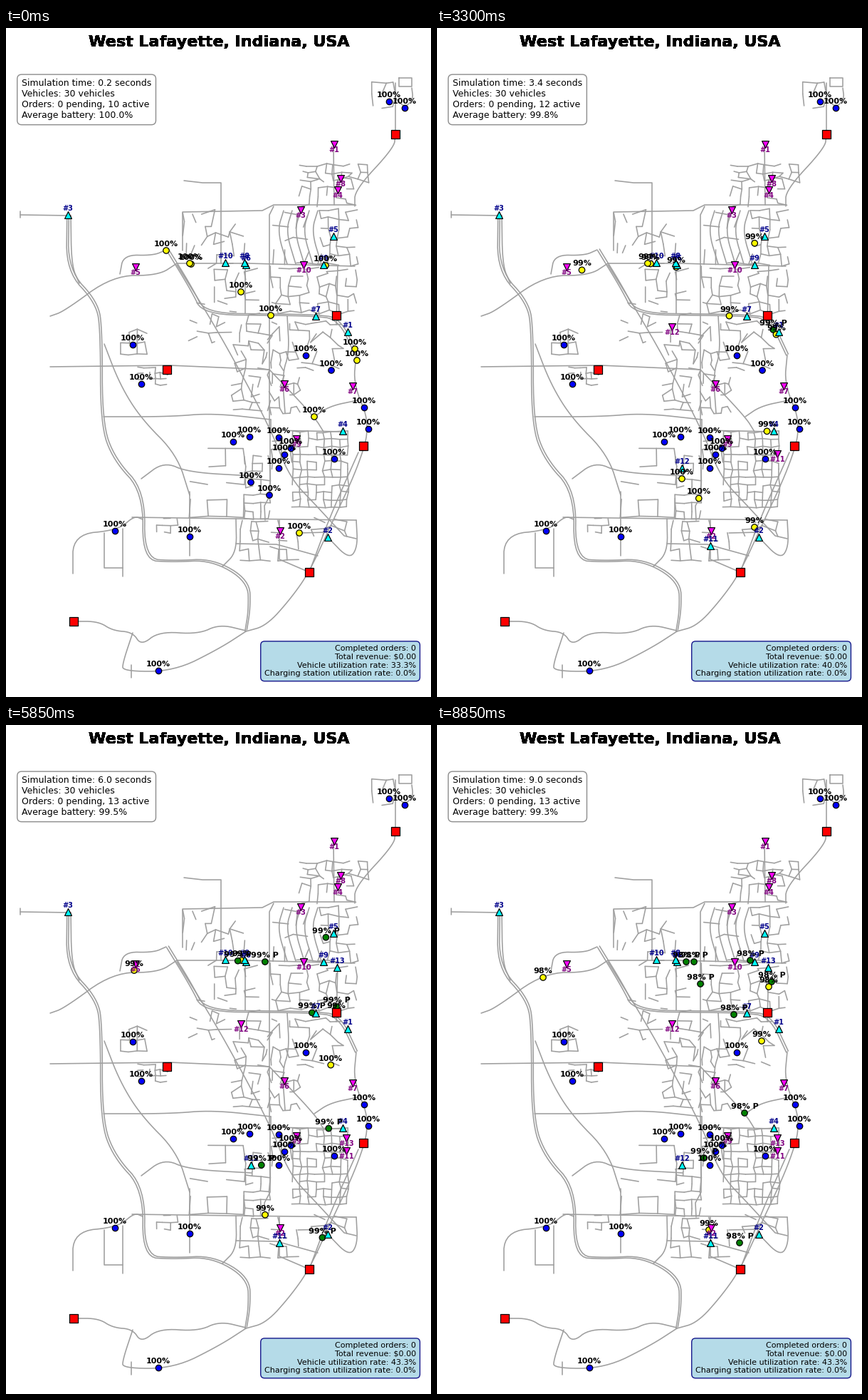
Recreate the animation shown at these times as a matplotlib script. Size 597x938 px, loop 9000 ms.

```python
import matplotlib.pyplot as plt
import numpy as np
from matplotlib.animation import FuncAnimation
from matplotlib.collections import LineCollection

W, H, DPI = 597, 938, 100
FRAMES, INTERVAL = 60, 150
LAST = FRAMES - 1
CLOCK = np.cumsum(np.full(3 * FRAMES, 0.05))[2::3]

rng = np.random.default_rng(4)

fig = plt.figure(figsize=(W / DPI, H / DPI), dpi=DPI, facecolor="white")
ax = fig.add_axes([0, 0, 1, 1])
ax.set_xlim(0, W)
ax.set_ylim(H, 0)
ax.axis("off")

# ---------------------------------------------------------------- roads
lines = []


def road(*pts):
    lines.append(np.array(pts, float))


def curve(*pts, shift=(0, 0)):
    """Polyline with its corners cut round."""
    q = np.array(pts, float)
    for _ in range(3):
        a, b = q[:-1], q[1:]
        cut = np.stack([0.75 * a + 0.25 * b, 0.25 * a + 0.75 * b], 1)
        q = np.vstack([q[:1], cut.reshape(-1, 2), q[-1:]])
    lines.append(q + shift)


def twin(*pts):
    """Divided highway."""
    curve(*pts, shift=(1.3, -1))
    curve(*pts, shift=(-1.3, 1))


def district(x0, y0, x1, y1, step=12, keep=0.65, jitter=2):
    """Jittered street grid with some of its blocks left open."""
    nx = round((x1 - x0) / step) + 1
    ny = round((y1 - y0) / step) + 1
    grid = np.stack(np.meshgrid(np.linspace(x0, x1, nx),
                                np.linspace(y0, y1, ny)), -1)
    grid += rng.normal(0, jitter, grid.shape)
    for p in (grid, grid.swapaxes(0, 1)):
        edges = np.stack([p[:, :-1], p[:, 1:]], 2).reshape(-1, 2, 2)
        lines.extend(edges[rng.random(len(edges)) < keep])


# highways
road((20, 262), (91, 263))
road((20, 257), (20, 266))
twin((87, 263), (86, 340), (128, 385), (134, 425), (134, 555), (152, 605),
     (194, 650), (193, 745), (235, 748), (290, 745), (341, 775), (342, 815),
     (337, 845))
curve((91, 263), (92, 333), (103, 358))
twin((227, 311), (262, 368), (278, 401), (380, 402), (432, 403), (468, 407),
     (492, 458))
curve((492, 458), (488, 500), (512, 555), (495, 615), (455, 700), (426, 763),
      (400, 800), (366, 838), (337, 846))
curve((495, 595), (455, 685), (426, 763))
curve((240, 332), (300, 428), (372, 562), (398, 630), (436, 670))

# west and south
curve((62, 404), (82, 397), (150, 347), (214, 347), (240, 330))
curve((225, 311), (207, 319), (165, 318), (160, 345))
road((62, 475), (230, 473), (370, 479))
curve((138, 443), (160, 500), (190, 548), (240, 598), (258, 655))
road((258, 650), (258, 740))
curve((137, 545), (230, 545), (290, 540), (372, 549))
curve((190, 632), (222, 608), (256, 623), (345, 628))
curve((94, 765), (94, 710), (158, 704), (180, 684), (192, 689))
road((138, 708), (138, 757), (164, 757), (164, 769))
road((164, 702), (164, 757))
road((177, 686), (320, 688), (492, 690))
curve((95, 832), (130, 832), (150, 845), (178, 847), (190, 866), (215, 846),
      (270, 850), (300, 836), (337, 845))
curve((178, 848), (164, 890), (164, 902), (236, 902), (300, 870), (337, 846))
road((176, 893), (176, 911))

# north
curve((547, 150), (545, 168), (490, 227), (490, 250))
road((547, 77), (547, 150))
road((552, 70), (570, 70), (570, 82), (552, 82), (552, 70))
curve((547, 98), (560, 112), (572, 100), (570, 84))
road((250, 214), (276, 217), (302, 217), (302, 330))
road((248, 312), (248, 258), (360, 256), (376, 248), (490, 248))
road((376, 250), (370, 262), (370, 560))
road((460, 163), (461, 248))
road((240, 330), (340, 330), (490, 334))
road((466, 334), (464, 416))
road((336, 331), (336, 400))
for x in range(386, 440, 12):
    curve((x + 4, 256), (x - 5, 285), (x + 9, 331))

# centre and river bank
curve((370, 479), (433, 545), (446, 566))
curve((395, 404), (398, 455), (388, 485), (392, 540))
curve((433, 545), (455, 530), (494, 522))
road((372, 549), (372, 564), (473, 566))
road((371, 565), (371, 655), (363, 670), (364, 690))
curve((323, 688), (324, 735), (304, 755))
road((323, 723), (380, 724), (438, 740))
road((384, 690), (384, 745), (426, 763))
road((410, 708), (452, 707))
curve((452, 714), (482, 745), (494, 728), (492, 690))
road((436, 670), (475, 712), (492, 716))

# neighbourhoods
district(515, 76, 547, 108, 16)
district(413, 192, 508, 212)
district(413, 212, 490, 248)
district(440, 256, 492, 331)
district(376, 262, 440, 331, 16, 0.3)
district(250, 262, 335, 330, 14, 0.35, 3)
district(292, 340, 352, 382, 14, 0.45)
district(372, 338, 492, 398, 13, 0.55)
district(258, 386, 368, 440, 14, 0.3, 3)
district(372, 412, 470, 478, 13, 0.45, 3)
district(320, 442, 370, 535, 12, 0.5, 3)
district(374, 488, 412, 540, 11, 0.5, 3)
district(402, 566, 480, 672, 11, 0.8, 1)
district(374, 566, 402, 620, 12, 0.5)
district(335, 600, 370, 688, 11, 0.65, 1)
district(258, 590, 335, 686, 24, 0.5, 1)
district(330, 692, 410, 745, 13, 0.5)
district(432, 690, 475, 712, 13, 0.5)
district(160, 428, 196, 456, 12, 0.7)
district(185, 476, 226, 500, 9, 0.5, 1)
district(212, 688, 240, 708, 9, 0.6, 1)

ax.add_collection(LineCollection(lines, colors="#9f9f9f", linewidths=1.15,
                                 capstyle="round", zorder=1))

# ---------------------------------------------------------------- title
# Overlaid copies give the title its hard, heavy edges.
for _ in range(20):
    ax.text(299.5, 26, "West Lafayette, Indiana, USA", size=16,
            weight="bold", ha="center", va="baseline")

# ---------------------------------------------------------------- data
stations = [(547, 149), (464, 403), (226, 479), (502, 586), (426, 763),
            (95, 832)]
pickups = [(480, 426), (452, 714), (87, 262), (473, 565), (460, 292),
           (337, 332), (435, 404), (335, 329), (446, 332), (308, 329),
           (384, 726), (344, 617), (465, 340)]
dropoffs = [(461, 163), (385, 705), (414, 255), (466, 227), (182, 335),
            (391, 499), (487, 502), (470, 211), (408, 576), (418, 332),
            (478, 597), (330, 419), (478, 579)]
placed = [0] * 10 + [19, 19, 37]
parked = [(538, 103), (560, 112), (178, 444), (190, 499), (421, 459),
          (503, 532), (509, 562), (461, 604), (342, 573), (319, 580),
          (383, 574), (400, 589), (391, 598), (383, 617), (153, 705),
          (258, 713), (214, 901)]


def along(path, u):
    """Point at share u of the path's length."""
    p = np.array(path, float)
    s = np.r_[0, np.cumsum(np.hypot(*np.diff(p, axis=0).T))]
    d = np.clip(u, 0, 1) * s[-1]
    return np.interp(d, s, p[:, 0]), np.interp(d, s, p[:, 1])


class Trip:
    """Drives to the rider at an even pace, then on towards the goal."""

    def __init__(self, fetch, carry=(), boards=LAST, start=0, worn=False):
        self.fetch, self.carry = fetch, [fetch[-1], *carry]
        self.boards, self.start, self.worn = boards, start, worn

    def riding(self, n):
        return len(self.carry) > 1 and n >= self.boards

    def at(self, n):
        if self.riding(n):
            return along(self.carry, (n - self.boards) / (LAST - self.boards))
        return along(self.fetch, (n - self.start) / (self.boards - self.start))

    def charge(self, n):
        if n < self.start:
            return 100
        base, rate = (0.02, 0.205) if self.worn else (0, 0.2)
        return 100 - base - rate * 0.15 * (n - self.start + 1)

    def color(self, n):
        if n < self.start:
            return "blue"
        return "green" if self.riding(n) else "yellow"


trips = [
    Trip([(225, 312), (207, 324), (202, 346), (168, 343), (149, 354)]),
    Trip([(260, 331), (341, 330), (335, 329)], [(350, 332)], 48, worn=True),
    Trip([(258, 330), (308, 330)], [(361, 332)], 29, worn=True),
    Trip([(330, 370), (336, 365), (336, 332)], [(370, 332), (370, 363)], 24,
         worn=True),
    Trip([(372, 403), (435, 404)], [(407, 401), (417, 406)], 36),
    Trip([(449, 333), (443, 331), (443, 304), (460, 292)],
         [(447, 299), (443, 310), (440, 330)], 32),
    Trip([(490, 450), (477, 427), (480, 426)],
         [(477, 427), (464, 416), (464, 366), (470, 360)], 17),
    Trip([(493, 466), (492, 455), (471, 421), (464, 416), (464, 370),
          (466, 367)]),
    Trip([(433, 545), (440, 553), (447, 566), (473, 565)],
         [(455, 566), (442, 563), (432, 544)], 27, worn=True),
    Trip([(412, 708), (433, 707), (434, 700), (450, 700), (452, 714)],
         [(446, 720), (435, 711), (425, 726)], 32),
    Trip([(344, 637), (344, 617)], [(383, 617), (375, 607)], 31, start=19),
    Trip([(370, 655), (363, 669), (364, 688), (371, 708), (382, 708)],
         start=19),
    Trip([(457, 480), (453, 463), (456, 443)], start=37),
]
FLEET = len(parked) + len(trips)


# ---------------------------------------------------------------- artists
def marks(points, shape, size, color, z):
    x, y = np.transpose(points)
    return ax.scatter(x, y, s=size, marker=shape, c=color, edgecolors="black",
                      linewidths=0.9, zorder=z)


def tag(x, y, s, size, color, z):
    return ax.text(x, y, s, size=size, color=color, weight="bold",
                   ha="center", va="baseline", zorder=z)


def panel(x, y, size, face, edge, **align):
    return ax.text(x, y, "", size=size, zorder=10, **align,
                   bbox=dict(boxstyle="round,pad=0.5", fc=face, ec=edge,
                             alpha=0.9))


marks(stations, "s", 76, "red", 4)
marks(parked, "o", 37, "blue", 3)
for px, py in parked:
    tag(px, py - 6, "100%", 8, "black", 8)

cars = marks([t.at(0) for t in trips], "o", 37, "yellow", 3)
car_tags = [tag(0, 0, "", 8, "black", 8) for _ in trips]

orders = []
for i, (a, b) in enumerate(zip(pickups, dropoffs)):
    name = f"#{i + 1}"
    orders.append([
        marks([a], "^", 50, "cyan", 5),
        tag(a[0], a[1] - 5.6, name, 7, "darkblue", 7),
        marks([b], "v", 50, "magenta", 5),
        tag(b[0], b[1] + 11, name, 7, "purple", 7),
    ])

info = panel(22, 71.4, 9, "white", "gray", va="top")
stats = panel(575.9, 910.2, 8, "lightblue", "navy", ha="right", va="bottom")


def update(n):
    spots = [t.at(n) for t in trips]
    cars.set_offsets(spots)
    cars.set_facecolor([t.color(n) for t in trips])
    for t, label, (x, y) in zip(trips, car_tags, spots):
        label.set_position((x, y - 6))
        label.set_text(f"{t.charge(n):.0f}%" + " P" * t.riding(n))

    for first, group in zip(placed, orders):
        for artist in group:
            artist.set_visible(n >= first)

    active = sum(n >= first for first in placed)
    battery = (100 * len(parked) + sum(t.charge(n) for t in trips)) / FLEET
    info.set_text(f"Simulation time: {CLOCK[n]:.1f} seconds\n"
                  f"Vehicles: {FLEET} vehicles\n"
                  f"Orders: 0 pending, {active} active\n"
                  f"Average battery: {battery:.1f}%")
    stats.set_text("Completed orders: 0\n"
                   "Total revenue: $0.00\n"
                   f"Vehicle utilization rate: {100 * active / FLEET:.1f}%\n"
                   "Charging station utilization rate: 0.0%")
    return []


anim = FuncAnimation(fig, update, frames=FRAMES, interval=INTERVAL,
                     init_func=lambda: update(0), repeat=True, repeat_delay=0)
plt.show()
```
